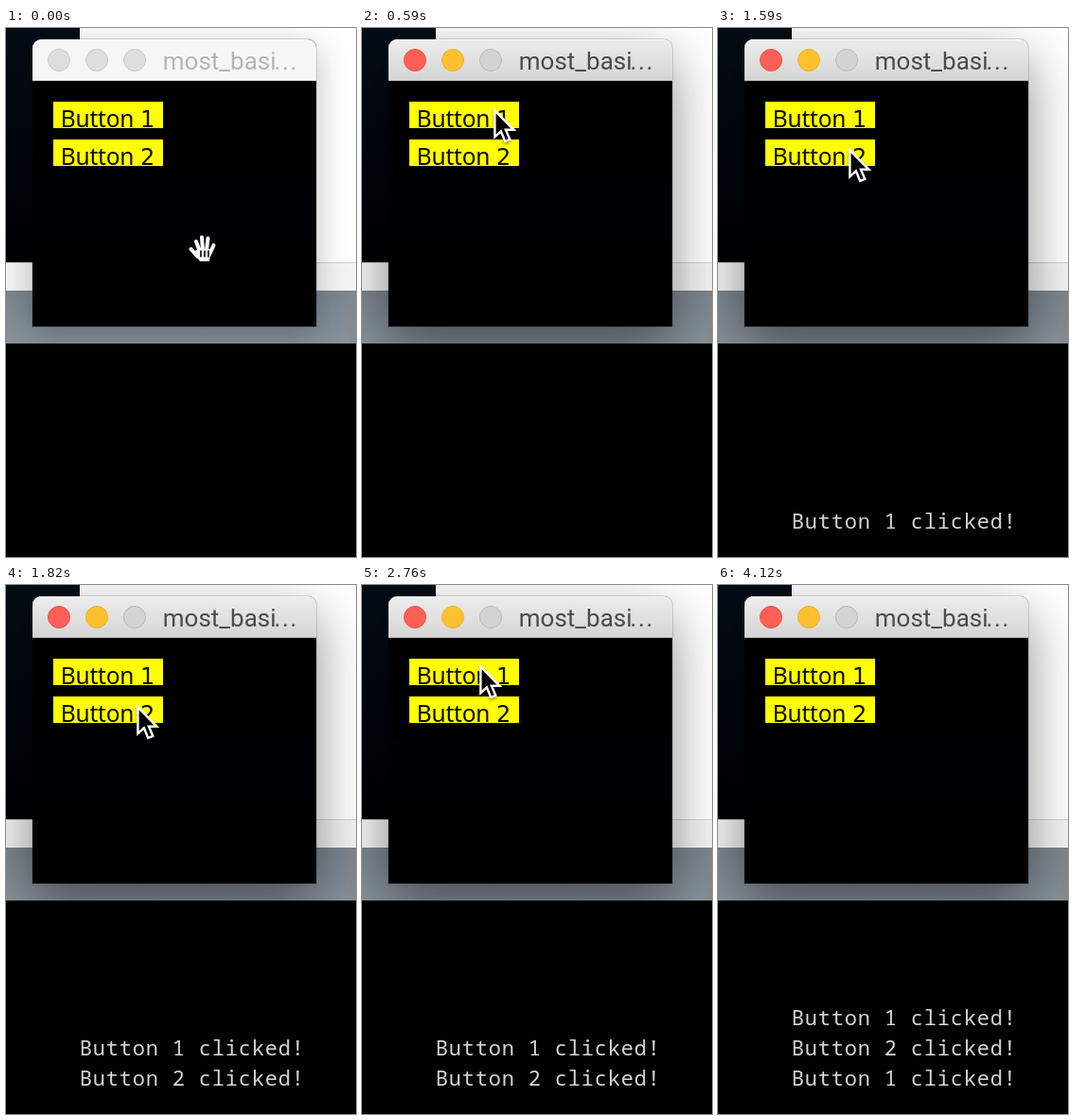
An HTML page that plays this animation: 370x560 px, repeating every 6240 ms.

```html
<!DOCTYPE html>
<html lang="en">
<head>
<meta charset="utf-8">
<title>Two buttons</title>
<style>
  html, body { margin: 0; width: 370px; height: 560px; overflow: hidden; background: #000101; }
  #stage { position: relative; width: 370px; height: 560px; overflow: hidden; }
  #stage > * { position: absolute; }

  /* Desktop behind the window */
  .desk { inset: 0 0 226px; overflow: hidden; background: #fff; }
  .desk > * { position: absolute; box-sizing: border-box; }
  .dark { left: 0; top: 0; width: 78px; height: 248px; background: linear-gradient(#040c16, #01050b 60%, #000103); }
  .bar { left: 0; top: 248px; width: 370px; height: 30px; background: #f4f4f4; border-top: 1px solid #d2d2d2; }
  .wall { left: 0; top: 278px; width: 370px; height: 56px;
    background: linear-gradient(90deg, #8a858000 360px, #8a858099), linear-gradient(#7b868f, #87929b); }

  .win { left: 28px; top: 12px; width: 300px; height: 304px; border-radius: 9px 9px 0 0;
    background: linear-gradient(#000 148px, #000005 150px 212px, #000 214px); }
  .win::before { content: ""; position: absolute; inset: 0 0 auto; height: 44px; box-sizing: border-box;
    border-radius: 9px 9px 0 0; border-bottom: 1px solid #c0c0c0; }
  .idle { box-shadow: 0 0 0 1px #0002, 0 8px 34px #0004; }
  .idle::before { background: #f6f6f6; border-color: #dadada; }
  .live { box-shadow: 0 0 0 1px #0002, 0 20px 56px #00000073; }
  .live::before { background: linear-gradient(#ededed, #d5d5d5); box-shadow: inset 0 1px #f7f7f7; }

  .title { font: 26px Roboto, "Liberation Sans", sans-serif; }
  .dots { letter-spacing: 1.7px; }
  .label { font: 24.5px "Noto Sans", "Open Sans", sans-serif; letter-spacing: -.2px; fill: #0c0c00; }
  .digit { font: 24px "DejaVu Sans", sans-serif; }
  .log { font: 22px "Noto Sans Mono", "DejaVu Sans Mono", monospace; letter-spacing: .8px; fill: #d4d4d4; }
  .arrow { fill: #000; stroke: #fff; stroke-width: 2.4; filter: drop-shadow(0 2px 1.5px #0006); }

  .early, .late, .hover, .log, .log text, .arrow { animation: 6240ms step-end infinite; }
  .early { animation-name: early; }
  .late { animation-name: late; }
  .hover { animation-name: hover; }
  .log { animation-name: scroll; }
  .log text:nth-child(1) { animation-name: print1; }
  .log text:nth-child(2) { animation-name: print2; }
  .log text:nth-child(3) { animation-name: print3; }
  .arrow { animation-name: move; }

  @keyframes early { 0% { visibility: visible } .961%, to { visibility: hidden } }
  @keyframes late { 0% { visibility: hidden } .961%, to { visibility: visible } }
  @keyframes hover { 0%, 66.025%, to { visibility: hidden } 65.064% { visibility: visible } }
  @keyframes print1 { 0% { visibility: hidden } 13.14%, to { visibility: visible } }
  @keyframes print2 { 0% { visibility: hidden } 28.204%, to { visibility: visible } }
  @keyframes print3 { 0% { visibility: hidden } 51.922%, to { visibility: visible } }

  /* A new line is printed at the bottom edge, then everything moves up one row */
  @keyframes scroll {
    0% { transform: translateY(0) }
    14.102% { transform: translateY(-32px) }
    29.166% { transform: translateY(-64px) }
    52.724%, to { transform: translateY(-96px) }
  }

  @keyframes move {
    0% { transform: translate(-60px, -60px) }
    .961% { transform: translate(207px, 232px) }
    /* to button 1 */
    3.846% { transform: translate(206px, 229px) }
    4.807% { transform: translate(199px, 208px) }
    5.769% { transform: translate(185px, 180px) }
    6.57% { transform: translate(170px, 152px) }
    7.532% { transform: translate(156px, 117px) }
    8.493% { transform: translate(145px, 95px) }
    9.455% { transform: translate(141px, 88px) }
    /* to button 2 */
    20.672% { transform: translate(141px, 93px) }
    21.634% { transform: translate(142px, 107px) }
    22.595% { transform: translate(143px, 122px) }
    23.557% { transform: translate(142px, 131px) }
    24.519% { transform: translate(141px, 133px) }
    25.48% { transform: translate(140px, 130px) }
    /* back to button 1 */
    39.582% { transform: translate(140px, 117px) }
    40.544% { transform: translate(134px, 98px) }
    41.505% { transform: translate(128px, 83px) }
    43.268% { transform: translate(126px, 79px) }
    44.23% { transform: translate(126px, 87px) }
    /* up to the title bar, then away */
    65.064% { transform: translate(139px, 25px) }
    66.025%, to { transform: translate(-60px, -60px) }
  }
</style>
</head>
<body>
<div id="stage">
  <div class="desk">
    <div class="dark"></div>
    <div class="bar"></div>
    <div class="wall"></div>
    <div class="win idle early"></div>
    <div class="win live late"></div>
  </div>
  <svg width="370" height="560" viewBox="0 0 370 560">
    <g class="early">
      <g fill="#dedede" stroke="#c9c9c9">
        <circle cx="56" cy="34" r="11.5"/>
        <circle cx="96" cy="34" r="11.5"/>
        <circle cx="136" cy="34" r="11.5"/>
      </g>
      <text class="title" x="165.8" y="44" fill="#b5b5b5">most_basi<tspan class="dots" x="283.5">...</tspan></text>
    </g>
    <g class="late">
      <circle cx="56" cy="34" r="11.5" fill="#ff5f57" stroke="#ec5249"/>
      <circle cx="96" cy="34" r="11.5" fill="#fdc130" stroke="#ecb22e"/>
      <circle cx="136" cy="34" r="11.5" fill="#d3d3d3" stroke="#bababa"/>
      <text class="title" x="165.8" y="44" fill="#4b4b4b">most_basi<tspan class="dots" x="283.5">...</tspan></text>
    </g>
    <g class="hover" fill="none" stroke-width="2.2">
      <path d="M51.5 29.5l9 9m0-9l-9 9" stroke="#7d0a08"/>
      <path d="M90 34h12" stroke="#985700"/>
    </g>

    <path d="M50 78h116v28H50zM50 118h116v28H50z" fill="#ff0"/>
    <text class="label" x="57.8" y="104.5">Button<tspan class="digit" x="142">1</tspan></text>
    <text class="label" x="57.8" y="144.5">Button<tspan class="digit" x="142">2</tspan></text>

    <g class="log">
      <text x="77.8" y="562">Button 1 clicked!</text>
      <text x="77.8" y="594">Button 2 clicked!</text>
      <text x="77.8" y="626">Button 1 clicked!</text>
    </g>

    <g class="early" fill="none" stroke-linecap="round">
      <path d="M203 234H217L215 247H205L198 237Z" fill="#fff"/>
      <path d="M201 226l4 11M207 221.5l1 14M213.5 222.5l-1.5 13M219.5 230l-4.5 10M195.5 234l7 8" stroke="#fff" stroke-width="4"/>
      <path d="M206 236v6M210 236v6M214 236v6" stroke="#000" stroke-width="1.6"/>
    </g>
    <path class="arrow" d="M-.6 -.7V27.3L5.9 21.4L10.2 32L15.3 29.9L10.9 19.8H19.5Z"/>
  </svg>
</div>
</body>
</html>
```
